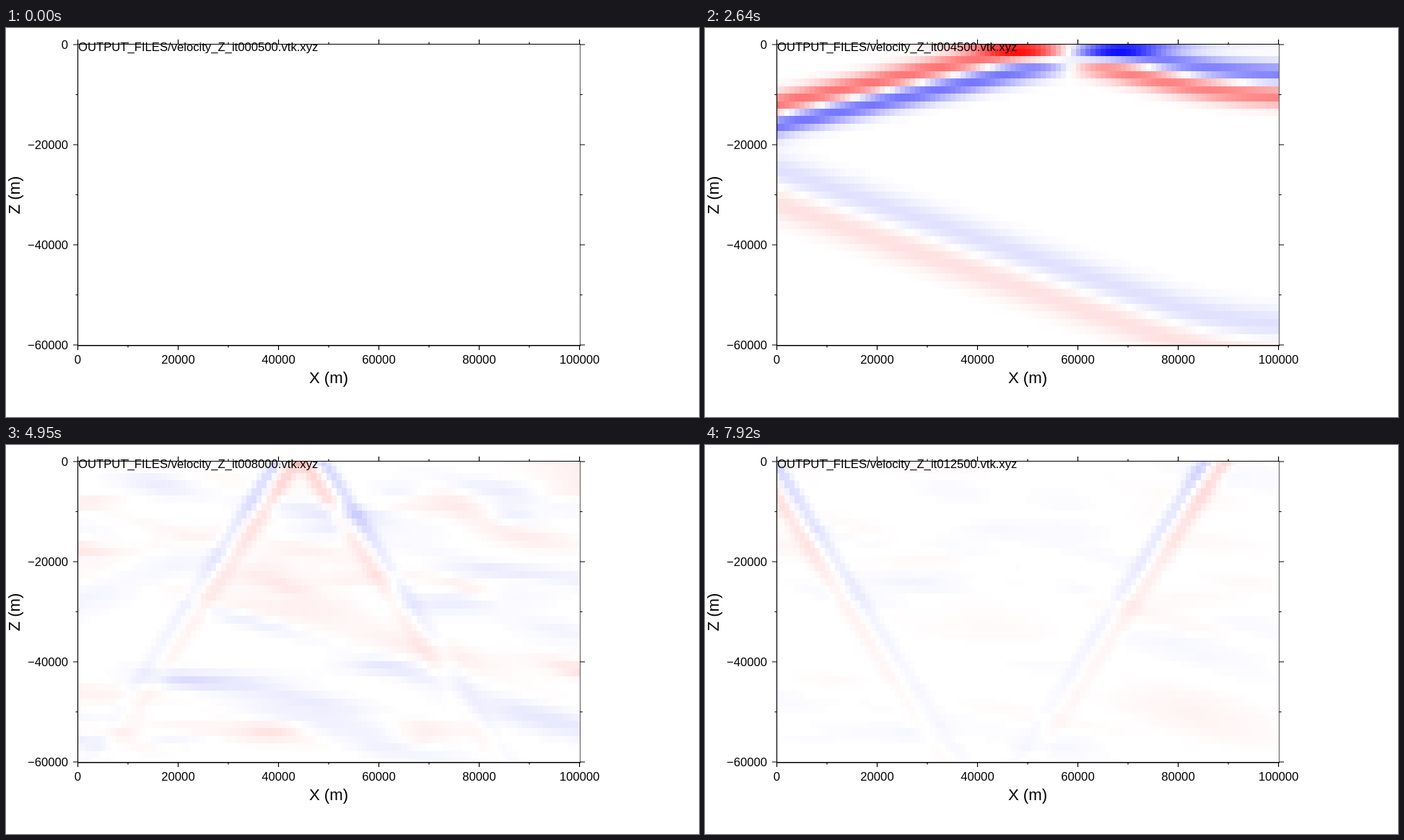
These frames come from a looping animation (960x540 px, 8000 ms). An HTML page with a canvas:

```html
<!DOCTYPE html>
<html lang="en">
<head>
<meta charset="utf-8">
<title>Wave field</title>
<style>
html, body { margin: 0; width: 100%; height: 100%; overflow: hidden; background: #fff; }
canvas, svg { position: absolute; left: 0; top: 0; width: 960px; height: 540px; }
text { font: 16.67px "Liberation Sans", Arial, sans-serif; font-kerning: none; fill: #000; }
.axis { font-size: 22.2px; text-anchor: middle; }
path { fill: none; stroke: #000; stroke-width: 1.2; }
#bottom { stroke-width: 1.6; }
#right { stroke-width: .7; }
</style>
</head>
<body>
<canvas id="field" width="960" height="540"></canvas>
<svg id="plot" viewBox="0 0 960 540">
  <path d="M99.5 440V22.5H795"/>
  <path id="bottom" d="M99 440.8H796"/>
  <path id="right" d="M795.35 22V441"/>
  <path id="ticks"/>
  <text id="title" x="100" y="32"></text>
  <text class="axis" x="447" y="493">X (m)</text>
  <text class="axis" transform="translate(19 232) rotate(-90)">Z (m)</text>
</svg>
<script>
const LEFT = 100, TOP = 23, WIDTH = 695, HEIGHT = 417, COLS = 100, ROWS = 40;
const LOOP = 8000, HOLD = 330, STEP = 500;

// Distances in km (x 0..100, depth z 0..60), time t in thousands of steps.
const SPEED = 96.4;                  // every plane wave sweeps left at this speed
const INTERFACE = 18;                // a slower layer lies above this depth
const SLOPE_ABOVE = .225, SLOPE_BELOW = .345;
const PULSE_WIDTH = 10, PULSE_GAP = 19;

const clamp01 = u => Math.max(0, Math.min(1, u));
const smooth = u => (u = clamp01(u), u * u * (3 - 2 * u));
const gauss = u => u * u > 9 ? 0 : Math.exp(-u * u);

// Sideways distance a front covers between the interface and depth z
const travel = z => (z - INTERFACE) / (z < INTERFACE ? SLOPE_ABOVE : SLOPE_BELOW);
const pulse = lag => gauss(lag / PULSE_WIDTH) - gauss((lag - PULSE_GAP) / PULSE_WIDTH);
const above = z => smooth((INTERFACE + 1.5 - z) / 3);
const below = z => 1 - above(z);

// start: where the front crosses the interface; way: 1 going down, -1 going up
const waves = [
  { start: 69, way: -1, amp: z => .55 - .1 * below(z) },             // incident
  { start: 57, way: 1, amp: z => .12 * below(z) },                   // off the interface
  { start: 221, way: 1, amp: z => .5 - .07 * below(z) },             // off the surface
  { start: 226, way: -1, amp: z => -.18 * above(z) },                // surface multiple
  { start: 271, way: 1, amp: z => .09 * below(z) },                  // converted wave
  { start: 412, way: 1, amp: z => -.17 * above(z) },                 // second multiple
  { start: 442, way: -1, amp: z => .35 * Math.exp((z - 60) / 15) }   // off the floor
];

function planeWaves(x, z, t) {
  // Fronts flatten towards the right edge.
  const s = x - Math.max(0, x - 75) ** 2 / 60 + SPEED * (t - 3.5);
  return waves.reduce((sum, w) => sum + w.amp(z) * pulse(s - w.start - w.way * travel(z)), 0);
}

// Slanted pair of stripes trailing a surface wave, red ahead of blue
function surfaceWave(x, z, head, way) {
  const ahead = way * (x - head) + .63 * z;
  return .17 * Math.exp(-z / 25) * (gauss((ahead - 2) / 1.8) - gauss((ahead + 2) / 1.6));
}

function surfaceWaves(x, z, t) {
  const age = t - 6;
  return smooth((t - 4.5) / 1.5) * (
    surfaceWave(x, z, 12 + 16.1 * age - .7 * age * age, 1) +
    surfaceWave(x, z, 69 - 11 * age, -1));
}

// Scattered energy: seeded streaks that drift, swing between red and blue and die away
let seed = 7;
const random = () => (seed = seed * 16807 % 2147483647) / 2147483647;
const streaks = Array.from({ length: 80 }, () => ({
  x: random() * 110, z: random() * 60, length: 5 + 11 * random(), thick: 1.2 + 1.5 * random(),
  slope: .4 * random() - .1, phase: 2 * Math.PI * random()
}));

function scatter(x, z, t) {
  const level = .09 * smooth((t - 4.5) / 2.5) * Math.exp(-Math.max(0, t - 7) / 4);
  if (!level) return 0;
  let sum = 0;
  for (const k of streaks) {
    const dx = x - k.x + 2 * (t - 7);
    sum += Math.sin(k.phase + t) * gauss(dx / k.length) * gauss((z - k.z - k.slope * dx) / k.thick);
  }
  return level * sum;
}

const ctx = document.getElementById('field').getContext('2d');
const edge = (start, size, count, i) => Math.round(start + size * clamp01((i - .5) / count));
const edgeX = i => edge(LEFT, WIDTH, COLS, i);
const edgeY = j => edge(TOP + .4, HEIGHT, ROWS, j);

function drawField(t) {
  ctx.clearRect(0, 0, 960, 540);
  for (let j = 0; j <= ROWS; j++) for (let i = 0; i <= COLS; i++) {
    const x = 100 * i / COLS, z = 60 * j / ROWS;
    const v = planeWaves(x, z, t) + surfaceWaves(x, z, t) + scatter(x, z, t);
    const pale = Math.round(255 * (1 - Math.min(1, Math.abs(v))));
    if (pale > 253) continue;
    ctx.fillStyle = v > 0 ? `rgb(255,${pale},${pale})` : `rgb(${pale},${pale},255)`;
    ctx.fillRect(edgeX(i), edgeY(j), edgeX(i + 1) - edgeX(i), edgeY(j + 1) - edgeY(j));
  }
}

const plot = document.getElementById('plot');
function label(text, x, y, anchor) {
  const el = document.createElementNS('http://www.w3.org/2000/svg', 'text');
  el.textContent = text;
  el.setAttribute('x', x);
  el.setAttribute('y', y);
  el.setAttribute('text-anchor', anchor);
  plot.append(el);
}

function drawAxes() {
  let d = '';
  for (let k = 0; k <= 10; k++) {
    const x = 99.5 + 69.5 * k, len = k % 2 ? 3.5 : 7;
    d += `M${x} 23v${-len}M${x} 440v${len}`;
    if (k % 2 === 0) label(k * 10000, x, 466, 'middle');
  }
  for (let k = 0; k <= 6; k++) {
    const y = 23 + 69.5 * k, len = k % 2 ? 3.5 : 7;
    d += `M100 ${y}h${-len}M795 ${y}h${len}`;
    if (k % 2 === 0) label(k ? '\u2212' + k * 10000 : '0', 86, y + 6, 'end');
  }
  document.getElementById('ticks').setAttribute('d', d);
}

const title = document.getElementById('title');
let shown = 0;
function tick() {
  const step = STEP * (1 + Math.floor(performance.now() % LOOP / HOLD));
  if (step !== shown) {
    shown = step;
    title.textContent = `OUTPUT_FILES/velocity_Z_it${String(step).padStart(6, '0')}.vtk.xyz`;
    drawField(step / 1000);
  }
  requestAnimationFrame(tick);
}

drawAxes();
tick();
</script>
</body>
</html>
```
